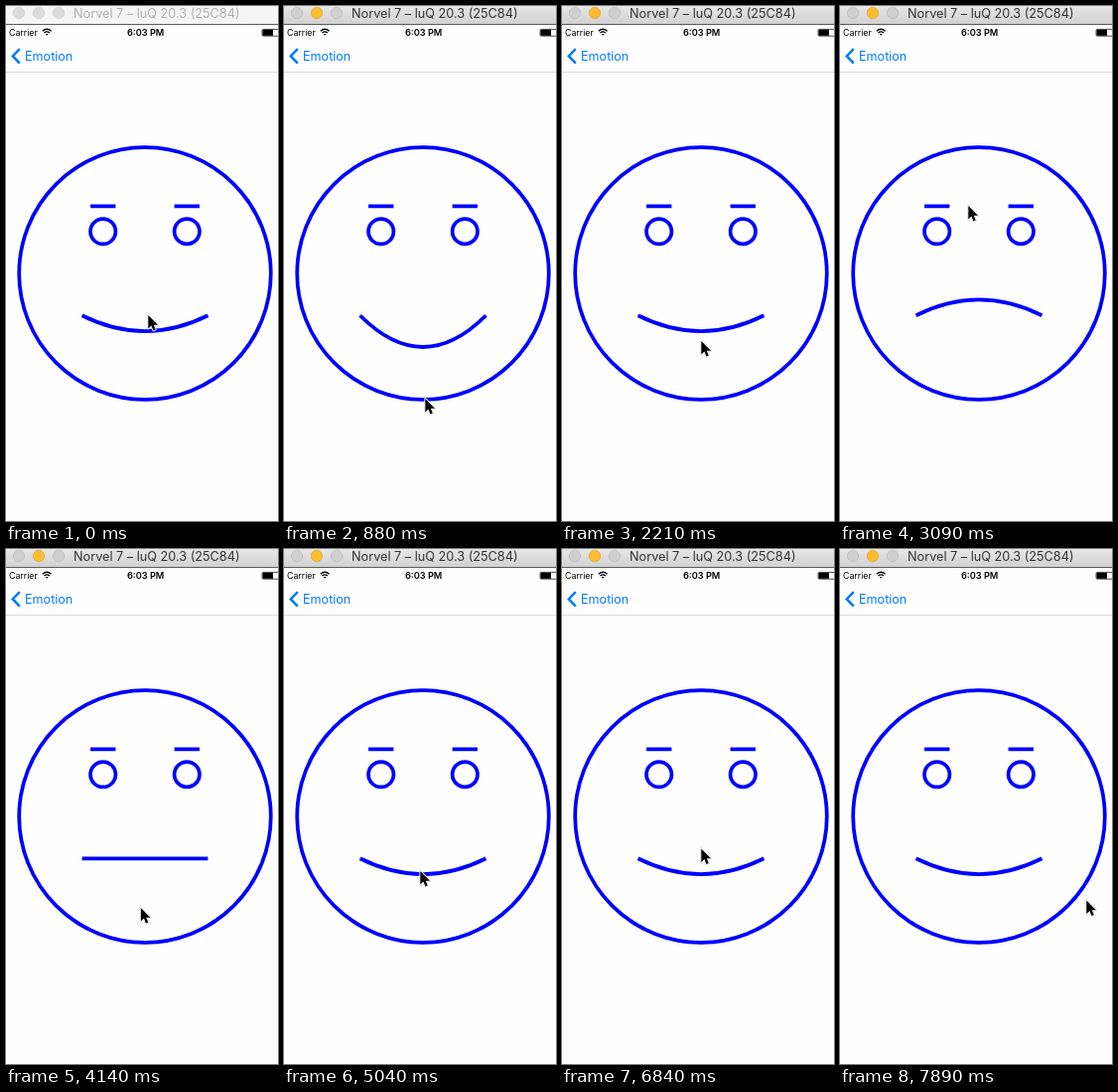
An HTML page for the animation above (8000 ms loop, 274 by 518 pixels).

```html
<!DOCTYPE html>
<html lang="en">
<head>
<meta charset="utf-8">
<title>Emotion</title>
<style>
  html, body { margin: 0; width: 100%; height: 100%; overflow: hidden; background: #fefefe; }
  svg { display: block; width: 274px; height: 518px; }
  text { font-family: Inter, Roboto, sans-serif; }
  .face { fill: none; stroke: #00f; stroke-width: 3.75; }
  #cursor { filter: drop-shadow(0 .7px .7px rgba(0, 0, 0, .4)); }
</style>
</head>
<body>
<svg viewBox="0 0 274 518">
  <defs>
    <linearGradient id="bar" x2="0" y2="1">
      <stop offset="0" stop-color="#e6e6e6"/>
      <stop offset="1" stop-color="#d2d2d2"/>
    </linearGradient>
  </defs>
  <rect width="274" height="518" fill="#fefefe"/>

  <rect id="titleBar" width="274" height="18"/>
  <path d="M0 18.5H274" stroke="#5c5c5c"/>
  <g id="lights" stroke-width=".7">
    <circle cx="13" cy="7" r="5.7"/>
    <circle cx="33" cy="7" r="5.7"/>
    <circle cx="53" cy="7" r="5.7"/>
  </g>
  <text id="title" x="68" y="12" font-size="12.7">Norvel 7 – luQ 20.3 (25C84)</text>

  <text x="3" y="30" font-size="8.8">Carrier</text>
  <g fill="none" stroke="#000" stroke-width="1.3">
    <path d="M36.8 25.2Q41.2 21.2 45.6 25.2M38.5 27.1Q41.2 24.7 43.9 27.1"/>
    <path d="M39.8 28L41.2 29.7 42.6 28Z" fill="#000" stroke="none"/>
  </g>
  <text x="140.6" y="30" font-size="9.2" font-weight="600" text-anchor="middle">6:03 PM</text>
  <rect x="258" y="23.4" width="19" height="6.8" rx="1.2" fill="none" stroke="#222" stroke-width=".8"/>
  <rect x="258.5" y="23.8" width="10.5" height="6"/>

  <path d="M13.8 43.2L6.8 50.4 13.8 57.6" fill="none" stroke="#007aff" stroke-width="2.5"/>
  <text x="19" y="55" font-size="12.6" fill="#007aff">Emotion</text>
  <path d="M0 66.5H274" stroke="#dcdcdc"/>

  <g class="face">
    <circle id="skull"/>
    <path id="brows"/>
    <path id="eyes"/>
    <path id="mouth"/>
  </g>

  <path id="cursor" d="M0 0V15L3.5 11.8 5.7 17.2 8.3 16.1 6 10.8H10.8Z"
        stroke="#fff" stroke-width="2" paint-order="stroke" stroke-linejoin="round"/>
</svg>

<script>
const LOOP = 8000, ACTIVE_AT = 290;
const STEP = 150, MOVE = 2 * STEP;
const CX = 140, CY = 269, R = 126.8, THIRD = R / 3, EYE = R / 10;
const $ = id => document.getElementById(id);
const set = (id, attrs) => {
  for (const name in attrs) $(id).setAttribute(name, attrs[name]);
};

// Turning points of the pointer: time, x, y.
const stops = [
  [0, 142.5, 310], [590, 142, 420], [740, 142, 420], [880, 141.5, 394],
  [1180, 141.5, 285], [1460, 142, 481], [1610, 141.5, 384],
  [2060, 138, 288], [2360, 141, 384], [2660, 132, 195], [2950, 138, 384],
  [3090, 128.5, 200], [3240, 128, 187], [3840, 135, 360], [4440, 134, 299],
  [4740, 137, 451], [4890, 137, 451], [5040, 136.5, 323], [5490, 139.5, 300.5],
  [7290, 160, 330], [7590, 215, 362], [7890, 247.5, 352.5]
];
const swipesDown = [440, 3840, 4590];
const swipesUp = [2060, 2660, 3090];
const taps = [0, 1, 2, 3].map(i => 5490 + 450 * i);

const count = (times, t) => times.filter(at => at <= t).length;

// Eases towards the next stop in steps, resting first if there is time left.
function pointer(t) {
  const next = stops.findIndex(stop => stop[0] > t);
  if (next < 0) return stops[stops.length - 1].slice(1);
  const [t0, x0, y0] = stops[next - 1], [t1, x1, y1] = stops[next];
  const start = Math.max(t0, t1 - MOVE), steps = Math.round((t1 - start) / STEP);
  const u = Math.max(0, Math.floor((t - start) / (t1 - start) * steps + .01) / steps);
  const k = (1 - Math.cos(Math.PI * u)) / 2;
  return [x0 + (x1 - x0) * k, y0 + (y1 - y0) * k];
}

const both = shape => shape(CX - THIRD) + shape(CX + THIRD);
const line = y => both(x => `M${x - EYE} ${y}h${2 * EYE}`);
const rings = y => both(x =>
  `M${x - EYE} ${y}a${EYE} ${EYE} 0 1 1 ${2 * EYE} 0a${EYE} ${EYE} 0 1 1 ${-2 * EYE} 0Z`);

function drawWindow(active) {
  set('titleBar', { fill: active ? 'url(#bar)' : '#f5f5f5' });
  set('title', { fill: active ? '#333' : '#b0b0b0' });
  set('lights', { fill: active ? '#d0d0d0' : '#dcdcdc', stroke: active ? '#b9b9b9' : '#d0d0d0' });
  $('lights').children[1].style.fill = active ? '#fdbd2f' : '';
  $('lights').children[1].style.stroke = active ? '#e0a32c' : '';
}

function drawFace(t) {
  const curve = (1 + count(swipesDown, t) - count(swipesUp, t)) / 2;
  const y = CY + THIRD, bend = y + curve * THIRD, half = R / 2, inner = R / 6;
  set('mouth', { d: `M${CX - half} ${y}C${CX - inner} ${bend} ${CX + inner} ${bend} ${CX + half} ${y}` });
  const shut = count(taps, t) % 2 === 1;
  set('eyes', { d: (shut ? line : rings)(CY - THIRD) });
}

function draw(t) {
  drawWindow(t >= ACTIVE_AT);
  drawFace(t);
  const [x, y] = pointer(t);
  set('cursor', { transform: `translate(${x + .8} ${y + 1}) scale(.9)` });
}

function tick(now) {
  draw(now % LOOP);
  requestAnimationFrame(tick);
}

set('skull', { cx: CX, cy: CY, r: R });
set('brows', { d: line(CY - THIRD - 2 * EYE) });
draw(0);
requestAnimationFrame(tick);
</script>
</body>
</html>
```
